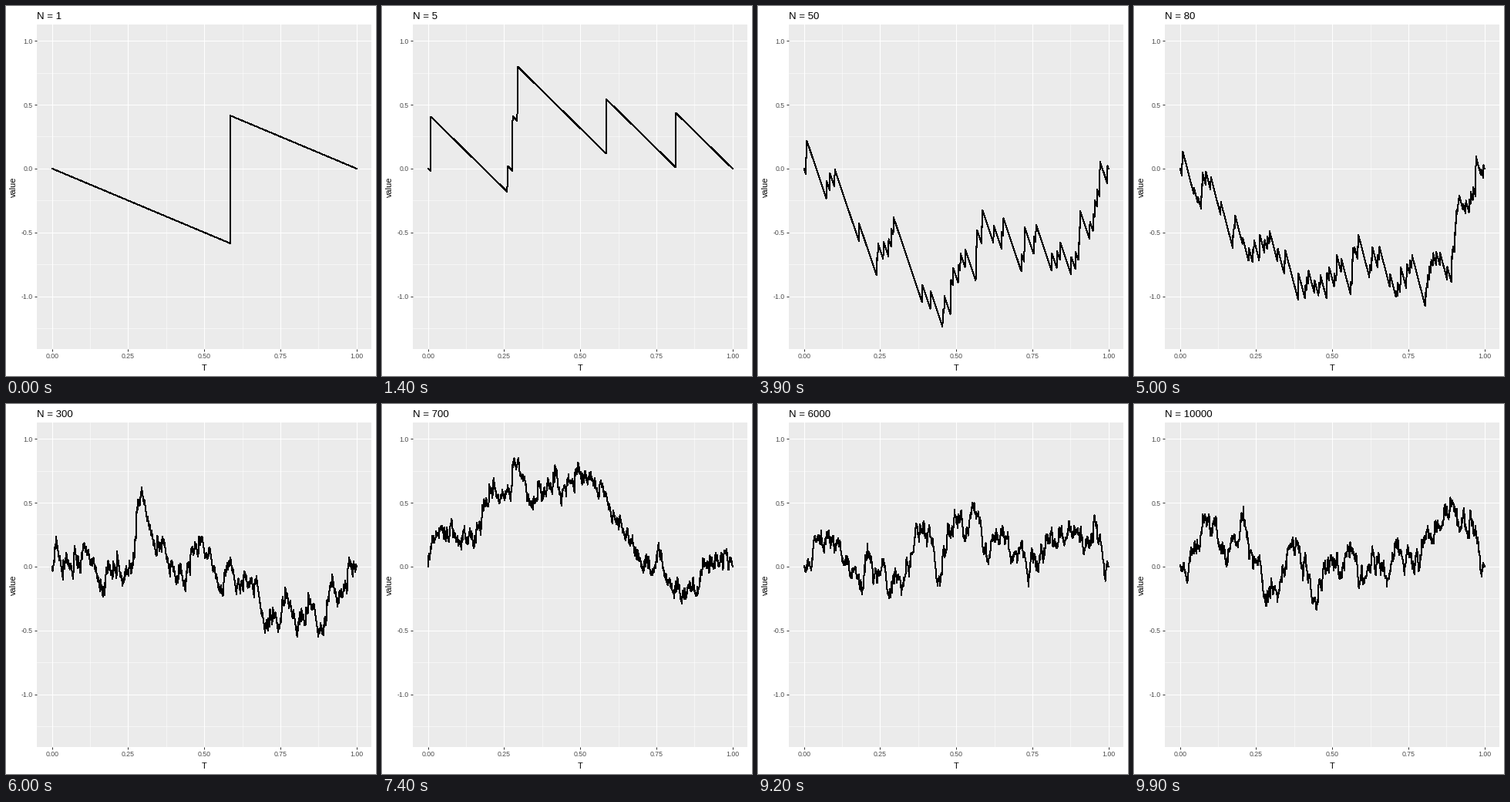
Recreate the animation shown at these times as a matplotlib script. Size 480 by 480 pixels, loop 10 s.

```python
import random

import matplotlib.pyplot as plt
import numpy as np
from matplotlib.animation import FuncAnimation

SIZE, DPI = 480, 72
LEFT, RIGHT, TOP, BOTTOM = 40, 474.4, 24, 445
plt.rcParams["font.family"] = "Liberation Sans"
plt.rcParams["path.simplify"] = False


def uniforms(seed, n):
    """Uniform draws from a Mersenne Twister seeded by a scrambled LCG."""
    key = []
    for i in range(675):
        seed = (69069 * seed + 1) % 2**32
        if i > 50:
            key.append(seed)
    rng = random.Random()
    rng.setstate((3, (*key, 624), None))
    return np.array([rng.getrandbits(32) / 2**32 for _ in range(n)])


sizes = [1] + [k * 10**e for e in range(4) for k in range(2, 11)]
sample = uniforms(4, sizes[-1])
t = np.linspace(0, 1, 1001)


def bridge(n):
    ecdf = np.searchsorted(np.sort(sample[:n]), t, side="right") / n
    return np.sqrt(n) * (ecdf - t)


paths = [bridge(n) for n in sizes]
low, high = np.min(paths), np.max(paths)
pad = 0.05 * (high - low)

fig = plt.figure(figsize=(SIZE / DPI, SIZE / DPI), dpi=DPI, facecolor="white")
ax = fig.add_axes([LEFT / SIZE, 1 - BOTTOM / SIZE,
                   (RIGHT - LEFT) / SIZE, (BOTTOM - TOP) / SIZE],
                  facecolor="#EBEBEB")
ax.set(xlim=(-0.05, 1.05), ylim=(low - pad, high + pad))
ax.spines[:].set_visible(False)
ax.set_axisbelow(True)

ax.set_xticks(np.arange(5) / 4, [f"{v / 4:.2f}" for v in range(5)])
ax.set_yticks(np.arange(-2, 3) / 2, [f"{v / 2:.1f}" for v in range(-2, 3)])
ax.set_xticks(np.arange(1, 8, 2) / 8, minor=True)
ax.set_yticks(np.arange(-5, 5, 2) / 4, minor=True)
ax.grid(which="major", color="white", lw=1.07)
ax.grid(which="minor", color="white", lw=0.53)
ax.tick_params(which="major", length=3, width=1, pad=2.2, color="#333333",
               labelcolor="#4D4D4D", labelsize=8.8)
ax.tick_params(which="minor", length=0)


def label(x, y, text, size, **kw):
    return fig.text(x / SIZE, 1 - y / SIZE, text, fontsize=size, **kw)


label(257, 473, "T", 11, ha="center")
label(15, 235, "value", 11, rotation=90, ha="right", va="center")
title = label(40, 17, "", 13.2)
line, = ax.plot([], [], color="black", lw=1, antialiased=False, snap=False)


def draw(i):
    # Small sizes hold for two ticks, the rest for one; then a halfway tick.
    if i < 81:
        k, blend = i // 3, i % 3 == 2
    else:
        k, blend = 27 + (i - 81) // 2, (i - 81) % 2 == 1
    y = (paths[k] + paths[k + 1]) / 2 if blend else paths[k]
    line.set_data(t, y)
    title.set_text(f"N = {sizes[k]}")
    return line, title


anim = FuncAnimation(fig, draw, frames=100, interval=100, repeat=True,
                     blit=False)
plt.show()
```
